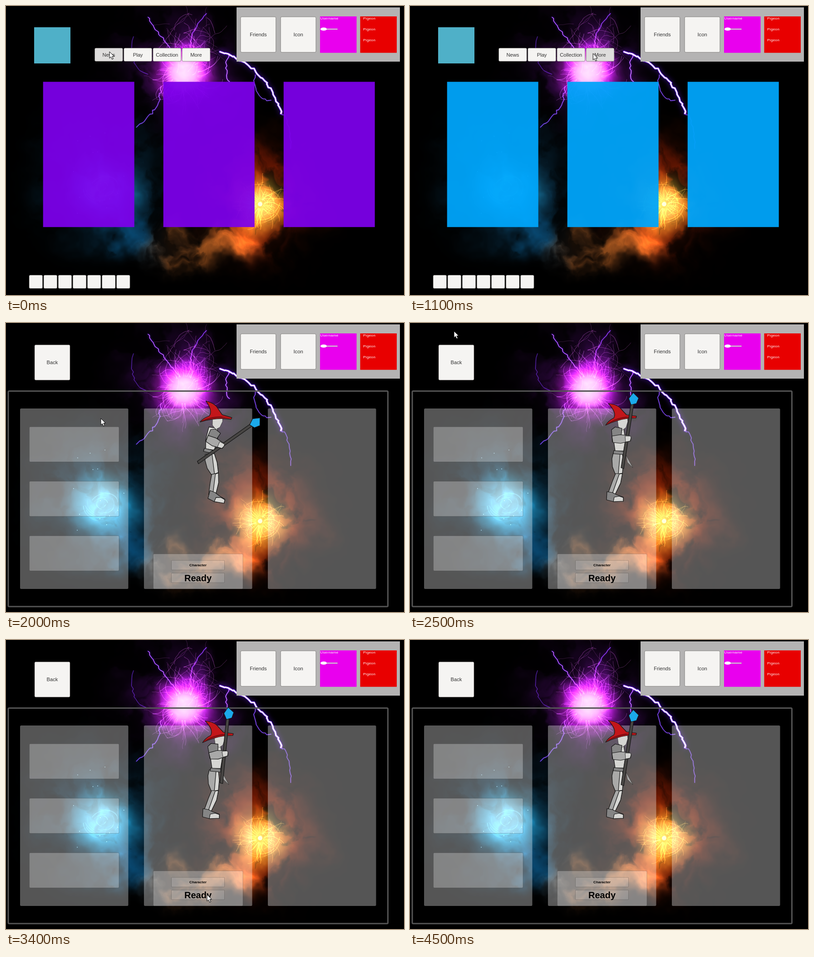
Recreate the animation shown at these times as an HTML page with a canvas. Size 877 px wide and 639 px high, loop 4600 ms.

```html
<!DOCTYPE html>
<html lang="en">
<head>
<meta charset="utf-8">
<title>Game menu</title>
<style>
  html, body { margin: 0; width: 877px; height: 639px; overflow: hidden; background: #000; }
  canvas, svg { position: absolute; left: 0; top: 0; display: block; }
  text { font-family: "Liberation Sans", Arial, sans-serif; }
  .btn rect { fill: #f5f4f2; stroke: #55534f; stroke-width: .6; }
  .btn text { font-size: 11.2px; fill: #323232; text-anchor: middle; }
  .small { font-size: 8px; fill: #fff; letter-spacing: .4px; }
  .glass { fill: #fff; fill-opacity: .335; }
  .slot { fill: #fff; fill-opacity: .27; stroke: #333; stroke-opacity: .4; stroke-width: .7; }
  .key { fill: #fff; fill-opacity: .13; stroke: #333; stroke-opacity: .4; stroke-width: .7; }
  .bold { font-weight: bold; text-anchor: middle; }
  #mage { stroke: #151515; stroke-width: 1.2; stroke-linejoin: round; }
  .lit { fill: #d6d6d3; } .mid { fill: #a9a9a8; } .dim { fill: #858585; }
  .hat { fill: #c3161a; } .fold { fill: #7d0c10; stroke: none; }
  .rod { fill: #484644; } .gem { fill: #1ba9ea; }
</style>
</head>
<body>
<canvas id="sky" width="877" height="639"></canvas>
<svg width="877" height="639" viewBox="0 0 877 639">
  <g id="home">
    <rect x="62" y="47" width="80" height="80" fill="#4fb0c8"/>
    <g id="cards"></g>
    <text id="cardText" x="182.5" y="339" font-size="29" fill="#fff" text-anchor="middle">Play</text>
    <g id="tabs"></g>
    <g id="dots"></g>
  </g>
  <g id="lobby">
    <rect x="5" y="150.5" width="836.5" height="476.5" rx="2" fill="none" stroke="#545454" stroke-width="3"/>
    <g id="panes"></g>
    <g id="slots"></g>
    <rect class="slot" x="324.5" y="510.5" width="197.5" height="77.5" rx="2"/>
    <rect class="key" x="364.5" y="525" width="117" height="21" rx="1"/>
    <rect class="key" x="364.5" y="553" width="117" height="21" rx="1"/>
    <text class="bold" x="423" y="538" font-size="8.1">Character</text>
    <text class="bold" x="423" y="570.5" font-size="20">Ready</text>
    <g id="mage">
      <path id="cape" class="mid" d="M476 292 491 320 479 308Z" stroke-width=".5"/>
      <g id="leg">
        <path class="mid" d="M448 287 468 288 470 310 468 332 453 336 446 318 445 300Z"/>
        <path class="lit" d="M463 288 468 288 470 310 468 332 459 334Z"/>
        <path class="mid" d="M453 333 468 333 464 354 452 379 437 375 446 350Z"/>
        <path class="lit" d="M461 334 468 333 464 354 452 379 446 377Z"/>
      </g>
      <g id="foot">
        <path class="dim" d="M434 373 446 375 456 380 470 385 470 394 448 395 433 391Z"/>
        <path class="lit" d="M450 385 461 383 470 386 470 394 448 395Z"/>
      </g>
      <g id="bust">
        <path class="lit" d="M452 234 471 234 475 258 471 283 452 283 449 262Z"/>
        <path class="dim" d="M449 282 471 284 471 291 448 289Z"/>
        <path class="lit" d="M457 214 479 209 480 218 476 231 468 237 459 229Z" stroke-width=".6"/>
        <path class="hat" d="M437 178Q457 180 465 190L477 203 499 206 498 210Q476 210 457 216 443 220 431 226 437 216 449 210 456 198 437 178Z"/>
        <path class="fold" d="M432 225Q448 211 475 207L498 208Q470 209 455 215Z"/>
      </g>
      <g id="staff">
        <path class="rod" d="M465 320 487 178 493 179 471 322Z"/>
        <path class="gem" d="M492 154 504 166 499 178 487 181 482 167Z"/>
      </g>
      <g id="arm">
        <path class="dim" d="M444 236 452 230 467 233 465 251 446 263Z"/>
        <path class="mid" d="M445 250 463 247 483 249 487 254 486 261 464 266 447 264Z"/>
        <path class="lit" d="M474 250 486 250 487 254 485 261 475 263Z" stroke-width=".8"/>
      </g>
    </g>
    <g id="back"></g>
  </g>
  <g id="head">
    <rect x="508" y="3" width="360" height="120" fill="#b4b3b3"/>
    <rect x="692" y="23" width="80.5" height="80.5" fill="#e900ee"/>
    <rect x="780.5" y="23" width="80.5" height="80.5" fill="#e80000"/>
    <text class="small" x="692.5" y="30.3">Username</text>
    <rect x="705" y="50" width="26" height="2.2" rx="1" fill="#f4e4f4" stroke="#844a86" stroke-width=".5"/>
    <ellipse cx="700" cy="51" rx="7" ry="3.6" fill="#fff"/>
  </g>
  <path id="mouse" d="M0 0V14.4L3.3 11.4 5.7 16.8 8.3 15.7 5.9 10.4H10.3Z" fill="#fff" stroke="#000"/>
</svg>
<script>
const W = 877, H = 639, TAU = Math.PI * 2;
const $ = id => document.getElementById(id);
const mix = (a, b, p) => a + (b - a) * p;
const ease = p => p * p * (3 - 2 * p);
const clamp = p => Math.min(1, Math.max(0, p));

// ---- backdrop ----
let seed = 7;
const rnd = () => {
  seed = seed + 0x6D2B79F5 | 0;
  let t = Math.imul(seed ^ seed >>> 15, 1 | seed);
  t = t + Math.imul(t ^ t >>> 7, 61 | t) ^ t;
  return ((t ^ t >>> 14) >>> 0) / 4294967296;
};
const spread = w => (rnd() - .5) * w;
const lattice = Float32Array.from({ length: 65536 }, rnd);
const cell = (i, j) => lattice[(i & 255) | (j & 255) << 8];

function noise(x, y) {
  const i = Math.floor(x), j = Math.floor(y), u = ease(x - i), v = ease(y - j);
  return mix(mix(cell(i, j), cell(i + 1, j), u), mix(cell(i, j + 1), cell(i + 1, j + 1), u), v);
}
function fbm(x, y, octaves) {
  let sum = 0;
  for (let o = 0, amp = .5; o < octaves; o++, amp /= 2) {
    sum += amp * (noise(x, y) - .5);
    x = x * 2 + 17; y = y * 2 + 31;
  }
  return sum;
}

const storm = { x: 393, y: 148, r: 58, tint: [215, 30, 235], haze: [58, 10, 82], heat: 200 };
const frost = { x: 212, y: 400, r: 62, tint: [30, 160, 205], haze: [10, 52, 78], heat: 55 };
const blaze = { x: 560, y: 438, r: 56, tint: [95, 125, 40], haze: [175, 38, 4], heat: 60 };

// Each orb is a body, a hot core and a wide haze; a trail of smoke joins frost to blaze.
function makeGlows() {
  const glows = [];
  for (const { x, y, r, tint, haze, heat } of [storm, frost, blaze]) {
    glows.push({ x, y, r, rgb: tint, smoke: .3 });
    glows.push({ x, y, r: r * .62, rgb: [heat, heat, heat], smoke: .1 });
    glows.push({ x, y: y - 8, r: r * 1.8, rgb: haze, smoke: .85 });
  }
  for (let i = 0; i <= 6; i++) {
    const a = mix(2.4, .95, i / 6), warm = ease(clamp(i / 2 - .6));
    glows.push({
      x: 400 + 215 * Math.cos(a), y: 345 + 190 * Math.sin(a), r: 36, smoke: .95,
      rgb: [mix(4, 125, warm), mix(44, 66, warm), mix(70, 24, warm)]
    });
  }
  return glows;
}

function paintSmoke() {
  const img = g.createImageData(W, H), d = img.data, glows = makeGlows();
  for (let y = 0, k = 0; y < H; y++) for (let x = 0; x < W; x++, k += 4) {
    const wx = fbm(x / 60, y / 60, 4), wy = fbm(x / 60 + 90, y / 60 + 40, 4);
    const n = fbm(x / 48 + wx * 1.6, y / 48 + wy * 1.6, 5);
    const wisp = Math.max(.12, .6 + n * 2.6 + .3 * Math.exp(-Math.abs(n) * 12));
    let red = 0, green = 0, blue = 0;
    for (const { x: cx, y: cy, r, rgb, smoke } of glows) {
      const dx = (x - cx + wx * 110 * smoke) / r, dy = (y - cy + wy * 110 * smoke) / r, q = dx * dx + dy * dy;
      if (q > 5) continue;
      const a = Math.exp(-q * mix(q, 1, smoke)) * mix(1, wisp, smoke);
      red += rgb[0] * a; green += rgb[1] * a; blue += rgb[2] * a;
    }
    d[k] = red; d[k + 1] = green; d[k + 2] = blue; d[k + 3] = 255;
  }
  g.putImageData(img, 0, 0);
}

function stroke(pts, width, color, blur = 0) {
  g.beginPath();
  pts.forEach(p => g.lineTo(...p));
  g.lineWidth = width; g.strokeStyle = color;
  g.shadowBlur = blur; g.shadowColor = "#6a20ff";
  g.stroke();
  g.shadowBlur = 0;
}
// Jagged line along a quadratic curve.
function bolt([ax, ay], [bx, by], [cx, cy], width, core) {
  const pts = [], n = Math.ceil(Math.hypot(cx - ax, cy - ay) / 6);
  for (let i = 0; i <= n; i++) {
    const p = i / n;
    pts.push([
      mix(mix(ax, bx, p), mix(bx, cx, p), p) + spread(5),
      mix(mix(ay, by, p), mix(by, cy, p), p) + spread(5)
    ]);
  }
  stroke(pts, width * 2, "rgba(110,40,255,.5)", width * 4);
  stroke(pts, width, core);
}
function tendril(x, y, dir, len, color) {
  const pts = [[x, y]], bend = spread(.2);
  for (let s = 0; s < len; s += 4) {
    dir += bend + spread(.7);
    pts.push([x += Math.cos(dir) * 4, y += Math.sin(dir) * 4]);
  }
  stroke(pts, .5 + rnd() * .8, color);
}
function rays({ x, y }, count, from, len, color) {
  for (let i = 0; i < count; i++) {
    const a = rnd() * TAU;
    tendril(x + Math.cos(a) * from, y + Math.sin(a) * from, a, len * (.4 + rnd()), color);
  }
}
function swirl({ x, y }, count, max, color) {
  g.strokeStyle = color;
  for (let i = 0; i < count; i++) {
    const r = 6 + (max - 6) * rnd(), a = rnd() * TAU;
    g.lineWidth = .5 + rnd();
    g.beginPath();
    g.ellipse(x, y, r * 1.1, r * (.7 + rnd() * .35), spread(1), a, a + .5 + rnd());
    g.stroke();
  }
}

const g = $("sky").getContext("2d");

function paintSky() {
  paintSmoke();
  g.globalCompositeOperation = "lighter";
  g.lineJoin = g.lineCap = "round";
  rays(storm, 70, 30, 52, "rgba(225,120,255,.35)");
  for (let i = 0; i < 34; i++) tendril(408 + spread(110), 68 + spread(60), rnd() * TAU, 25 + rnd() * 45, "rgba(185,85,195,.4)");
  bolt([380, 115], [340, 70], [312, 24], 1, "#b070c0");
  bolt([408, 105], [400, 60], [440, 18], .7, "#8a4f98");
  bolt([342, 178], [340, 235], [285, 270], .7, "#7d749c");
  bolt([312, 150], [270, 135], [280, 68], .4, "#3c3048");
  bolt([490, 108], [480, 140], [491, 168], 1, "#b48ce0");
  bolt([547, 150], [545, 205], [582, 209], .7, "#8076ac");
  bolt([604, 230], [630, 260], [629, 315], .6, "#6e6a94");
  bolt([473, 100], [580, 140], [607, 238], 2.8, "#fff");
  swirl(blaze, 24, 46, "rgba(255,215,90,.28)");
  rays(blaze, 55, 10, 42, "rgba(255,195,70,.3)");
  swirl(frost, 18, 46, "rgba(110,225,255,.22)");
  g.fillStyle = "rgba(255,240,190,.6)";
  g.beginPath(); g.arc(blaze.x, blaze.y, 5, 0, TAU); g.fill();
  g.fillStyle = "rgba(170,235,255,.8)";
  for (let i = 0; i < 14; i++) g.fillRect(frost.x + spread(130), 360 + spread(220), 1.5, 1.5);
}

// ---- interface ----
function add(parent, tag, attrs, text) {
  const el = document.createElementNS("http://www.w3.org/2000/svg", tag);
  for (const k in attrs) el.setAttribute(k, attrs[k]);
  if (text) el.textContent = text;
  return parent.appendChild(el);
}
const box = (id, x, y, width, height, extra) => add($(id), "rect", { x, y, width, height, ...extra });
function button(id, x, y, w, h, label) {
  const b = add($(id), "g", { class: "btn" });
  const face = add(b, "rect", { x, y, width: w, height: h, rx: 2.5 });
  if (label) add(b, "text", { x: x + w / 2, y: y + h / 2 + 4 }, label);
  return { face, x, y, w, h };
}

paintSky();
for (let i = 0; i < 3; i++) {
  box("cards", 81.7 + i * 265, 167.6, 201, 321.2);
  box("panes", 31 + i * 273, 189, 238.5, 399, { rx: 2.5, class: "glass" });
  box("slots", 51.5, 229.5 + i * 120.5, 197.5, 77.5, { rx: 2, class: "slot" });
  add($("head"), "text", { x: 787, y: 30.3 + i * 24, class: "small" }, "Pigeon");
}
for (let i = 0; i < 7; i++) button("dots", 51 + i * 32.1, 595, 29.5, 29.5);
const tabs = ["News", "Play", "Collection", "More"].map((s, i) => button("tabs", 195.5 + i * 64.2, 93, 61.8, 29.3, s));
const back = button("back", 63, 48.3, 78, 78, "Back");
["Friends", "Icon"].forEach((s, i) => button("head", 517 + i * 88.2, 24, 77.7, 78.3, s));

// ---- timeline ----
const tints = ["rgba(125,0,234,.94)", "rgba(29,0,233,.94)", "rgba(0,165,250,.95)", "rgba(20,255,100,.98)"];
const stops = [
  { t: 0, x: 228, y: 101 }, { t: 800, x: 340, y: 104 }, { t: 1200, x: 415, y: 105 }, { t: 1500, x: 280, y: 106 },
  { t: 2000, x: 209, y: 211 }, { t: 2500, x: 97, y: 18 }, { t: 3400, x: 443, y: 563 }
];
const lobbyAt = 2000, mouseGone = 4000;

function pointer(t) {
  const i = Math.max(1, stops.findIndex(s => s.t >= t)), end = t > stops.at(-1).t;
  const a = stops[end ? stops.length - 2 : i - 1], b = stops[end ? stops.length - 1 : i];
  const p = ease(clamp((t - a.t) / (b.t - a.t)));
  return { x: mix(a.x, b.x, p), y: mix(a.y, b.y, p) };
}
const tabAt = t => t < 500 ? 0 : t < 900 ? 1 : t < 1200 ? 2 : t < 1600 ? 3 : 1;
const show = (id, on) => { $(id).style.display = on ? "" : "none"; };
const over = (b, { x, y }) => x > b.x && x < b.x + b.w && y > b.y && y < b.y + b.h;
const move = (id, dx, dy, deg = 0, px = 0, py = 0) =>
  $(id).setAttribute("transform", `translate(${dx} ${dy}) rotate(${deg} ${px} ${py})`);

// Staff lowered on entry, then a slow breathing sway.
function poseMage(t) {
  const rest = t < lobbyAt + 100 ? 1 : 0;
  const s = rest ? 0 : (1 - Math.cos((t - 2500) / 2000 * TAU)) / 2;
  show("cape", !rest);
  move("leg", 0, 0, -12 * rest, 461, 332);
  move("foot", 13 * rest, rest, 12 * rest, 452, 384);
  move("bust", mix(2 * s, -2.5, rest), mix(s, -2, rest), 8.4 * rest, 465, 217);
  move("staff", mix(3 * s, -2, rest), mix(-5 * s, 16, rest), mix(-3.2 * s, 46, rest), 480, 256);
  move("arm", 2 * s, -s, mix(-6 * s, 28, rest), 448, 250);
}

function draw(t) {
  const at = pointer(t), lobby = t >= lobbyAt, tab = tabAt(t);
  show("home", !lobby);
  show("lobby", lobby);
  show("mouse", t < mouseGone);
  move("mouse", at.x, at.y);
  $("cards").style.fill = tints[tab];
  show("cardText", tab === 1);
  tabs.forEach((b, i) => {
    b.face.style.fill = over(b, at) ? "#dedddc" : i === tab ? "#eeecec" : "#f5f4f2";
  });
  back.face.style.fill = over(back, at) ? "#e2e1e0" : "#f5f4f2";
  poseMage(t);
}

// The picture steps every 100 ms, with two short holds.
function step(ms) {
  const t = Math.floor(ms % 4600 / 100) * 100;
  return t < 200 ? 0 : t > 3100 && t < 3400 ? 3100 : t;
}
let start = null;
function tick(now) {
  start ??= now;
  draw(step(now - start));
  requestAnimationFrame(tick);
}
draw(0);
requestAnimationFrame(tick);
</script>
</body>
</html>
```
